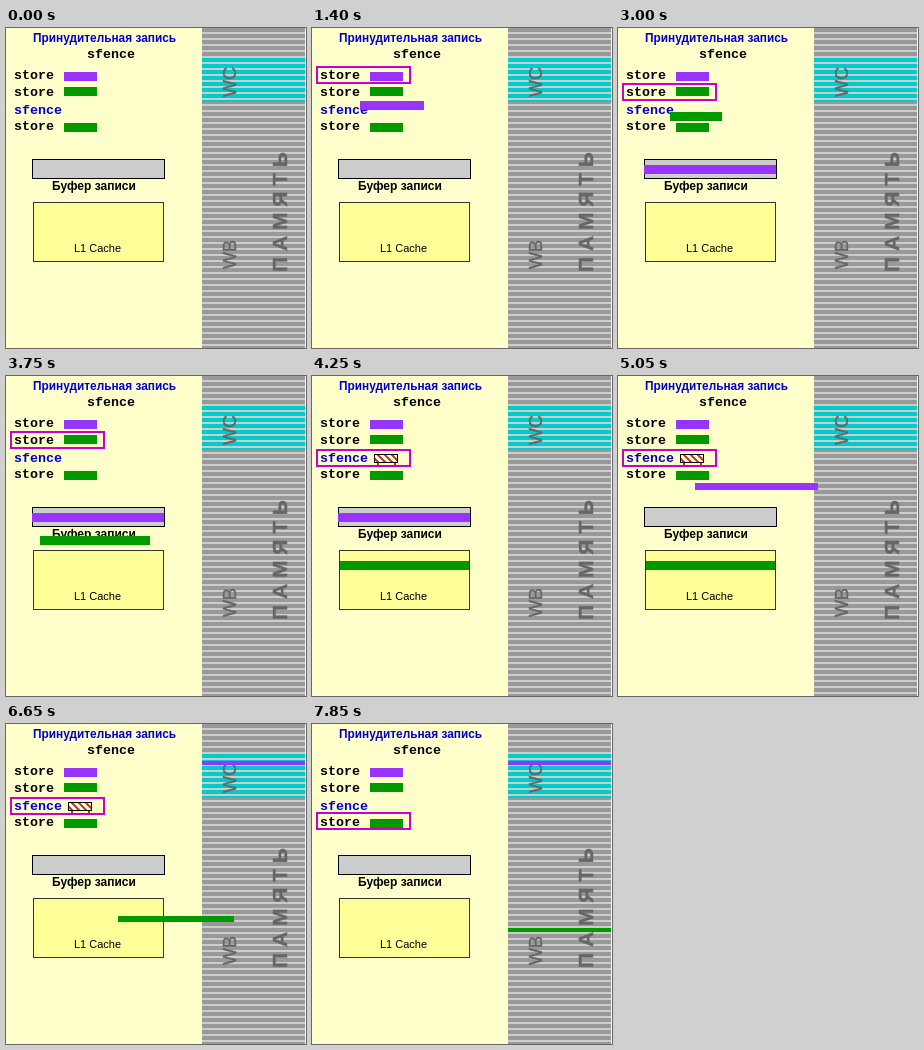
An HTML page with a canvas that plays this animation: 300 by 320 pixels, repeating every 8 s.

```html
<!DOCTYPE html>
<html lang="ru">
<head>
<meta charset="utf-8">
<title>sfence</title>
<style>
  html, body { margin: 0; width: 100%; height: 100%; overflow: hidden; background: #ffffcc; }
  canvas { display: block; }
</style>
</head>
<body>
<canvas id="stage" width="300" height="320"></canvas>
<script>
const ctx = document.getElementById('stage').getContext('2d');
const LOOP = 8000;
const PURPLE = '#9933ff', GREEN = '#009900', BLUE = '#0000cc';
const SANS = '"Liberation Sans", Arial, sans-serif';
const MONO = 'bold 13.333px "Liberation Mono", "Courier New", monospace';

const linear = u => u;
const easeOut = u => u + 0.35 * u * (1 - u);
const easeInOut = u => u - Math.sin(2 * Math.PI * u) / 26;

const rect = (left, top, right, bottom) => ({ left, top, right, bottom });

// Operands beside the instructions, and the rows they are written to
const operand = top => rect(58, top, 91, top + 9);
const memoryRow = top => rect(196, top, 299, top + 4);
const bufferRow = rect(26, 137, 158, 146);
const cacheRow = rect(28, 185, 157, 194);
const leavingCache = rect(112, 192, 228, 198);

// A move jumps through equal time steps; its first jump happens at `at`
const purpleMoves = [
  { at: 1400, steps: 4, gap: 250, from: operand(44), to: bufferRow, ease: easeOut },
  { at: 5050, steps: 3, gap: 400, from: bufferRow, to: memoryRow(37), ease: easeInOut }
];
const greenMoves = [
  { at: 3000, steps: 5, gap: 250, from: operand(59), to: cacheRow, ease: linear },
  { at: 6650, steps: 1, gap: 400, from: cacheRow, to: leavingCache, ease: linear },
  { at: 7050, steps: 1, gap: 400, from: leavingCache, to: memoryRow(204), ease: linear }
];
const cursorStops = [
  { at: 800, top: 38 }, { at: 2400, top: 55 },
  { at: 4250, top: 73, barrier: true }, { at: 7850, top: 88 }
];

const current = (list, t) => list.filter(item => item.at <= t).pop();

function box(x, y, w, h, color) {
  ctx.fillStyle = color;
  ctx.fillRect(x, y, w, h);
}

function framed(x, y, w, h, fill, edge) {
  box(x, y, w, h, edge);
  box(x + 1, y + 1, w - 2, h - 2, fill);
}

function label(text, x, y, font, color) {
  ctx.font = font;
  ctx.fillStyle = color;
  ctx.fillText(text, x, y);
}

function upward(text, x, y, font) {
  ctx.save();
  ctx.translate(x, y);
  ctx.rotate(-Math.PI / 2);
  label(text, 0, 0, font, '#666666');
  ctx.strokeStyle = '#666666';
  ctx.lineWidth = 0.4;
  ctx.strokeText(text, 0, 0);
  ctx.restore();
}

function drawMemory() {
  box(196, 0, 103, 320, '#999999');
  box(196, 30, 103, 44, '#00cccc');
  for (let y = 4; y < 320; y += 6) box(196, y, 103, 2, '#cccccc');
  upward('WC', 230, 69, '18px ' + SANS);
  upward('WB', 230, 241, '18px ' + SANS);
  upward('П А М Я Т Ь', 281, 244, 'bold 21px ' + SANS);
}

function drawProgram() {
  label('Принудительная запись', 27, 14, 'bold 11.85px ' + SANS, BLUE);
  label('sfence', 81, 30, MONO, '#000');
  label('sfence', 8, 86, MONO, BLUE);
  for (const y of [51, 68, 102]) label('store', 8, y, MONO, '#000');
  box(58, 44, 33, 9, PURPLE);
  box(58, 59, 33, 9, GREEN);
  box(58, 95, 33, 9, GREEN);
}

function drawStores() {
  framed(26, 131, 133, 20, '#cccccc', '#000');
  label('Буфер записи', 46, 162, 'bold 12px ' + SANS, '#000');
  framed(27, 174, 131, 60, '#ffff99', '#333333');
  label('L1 Cache', 68, 224, '11px ' + SANS, '#000');
}

function drawBarrier() {
  for (const x of [65, 82]) box(x, 86, 2, 4, '#cc3300');
  framed(62, 78, 24, 9, '#fff', '#000');
  ctx.save();
  ctx.beginPath();
  ctx.rect(63, 79, 22, 7);
  ctx.clip();
  ctx.strokeStyle = '#cc3300';
  ctx.lineWidth = 2;
  ctx.beginPath();
  for (let x = 58; x < 86; x += 7) {
    ctx.moveTo(x, 78);
    ctx.lineTo(x + 9, 87);
  }
  ctx.stroke();
  ctx.restore();
}

function drawMoving(moves, t, color) {
  const move = current(moves, t);
  if (!move) return;
  const { at, steps, gap, from, to, ease } = move;
  const step = Math.min(steps, 1 + Math.floor((t - at) / gap));
  const u = ease(step / steps);
  const side = key => Math.round(from[key] + (to[key] - from[key]) * u);
  const left = side('left'), top = side('top');
  box(left, top, side('right') - left, side('bottom') - top, color);
}

function drawCursor(t) {
  const stop = current(cursorStops, t);
  if (!stop) return;
  if (stop.barrier) drawBarrier();
  ctx.strokeStyle = '#cc00cc';
  ctx.lineWidth = 2;
  ctx.strokeRect(5, stop.top + 1, 93, 16);
}

function draw(t) {
  box(0, 0, 300, 320, '#ffffcc');
  drawMemory();
  drawProgram();
  drawStores();
  drawCursor(t);
  drawMoving(purpleMoves, t, PURPLE);
  drawMoving(greenMoves, t, GREEN);
}

const start = performance.now();
function tick() {
  draw((performance.now() - start) % LOOP);
  requestAnimationFrame(tick);
}
tick();
</script>
</body>
</html>
```
